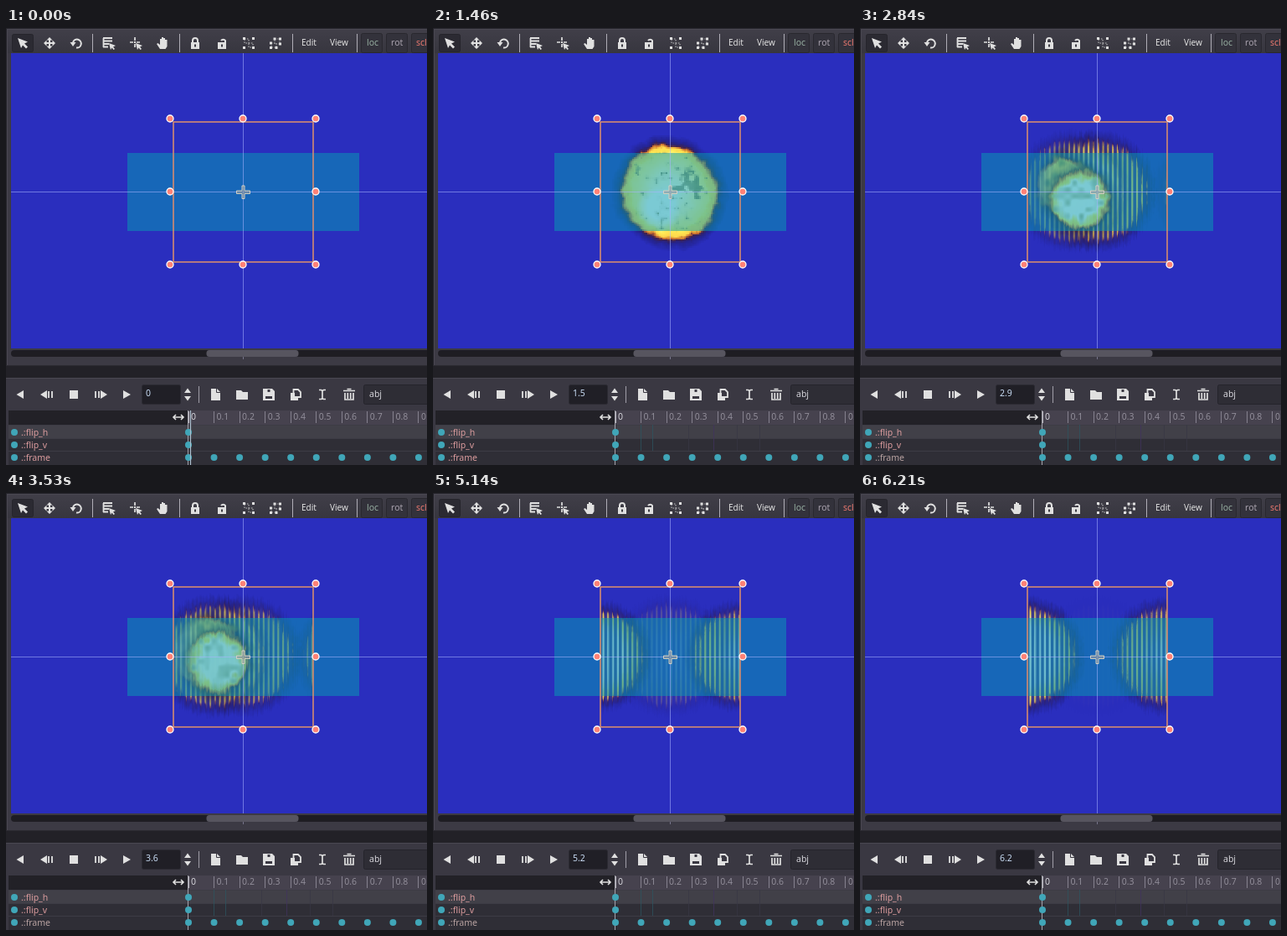
An HTML page with a canvas for the animation above (6290 ms loop, 503 by 521 pixels).

```html
<!DOCTYPE html>
<html lang="en">
<head>
<meta charset="utf-8">
<title>Sprite animation editor</title>
<style>
html, body { margin: 0; width: 100%; height: 100%; overflow: hidden; background: #3b3a43; }
svg, canvas { position: absolute; left: 0; top: 0; }
canvas { left: 200px; top: 112px; }
text { font: 10.5px "Noto Sans", "Open Sans", sans-serif; white-space: pre; }
.small { font-size: 10px; }
</style>
</head>
<body>
<svg id="base" width="503" height="521" viewBox="0 0 503 521">
  <defs>
    <linearGradient id="bar" x2="0" y2="1"><stop stop-color="#413f49"/><stop offset="1" stop-color="#37363f"/></linearGradient>
  </defs>
  <rect width="503" height="403" fill="#3c3a44"/>
  <rect width="503" height="30" fill="url(#bar)"/>
  <path d="M0 .5H503M.5 0V403" stroke="#25242b"/>
  <path d="M1 1.5H503M1.5 1V402" stroke="#4a4852"/>
  <rect x="6" y="30" width="497" height="352" fill="#2a2ebe"/>
  <rect x="6" y="384" width="510" height="8" rx="4" fill="#1e1d23"/>
  <rect x="239.500" y="384" width="110" height="8" rx="3.500" fill="#57555f"/>
  <rect y="403" width="503" height="14" fill="#222127"/>
  <rect y="417" width="503" height="104" fill="#3a3842"/>
  <path d="M0 402.500H503" stroke="#2b2a31"/>
  <path d="M0 417.500H503" stroke="#4a4852"/>
  <g id="tools" fill="none" stroke="#e0e0e0" stroke-width="2"></g>
  <g id="timeline"></g>
</svg>
<canvas id="fx" width="168" height="168"></canvas>
<svg id="over" width="503" height="521" viewBox="0 0 503 521">
  <rect x="145" y="149" width="277" height="93" fill="#069cb3" fill-opacity=".52"/>
  <path d="M6 195.500H503M283.500 30V382" stroke="#a9b4ff" stroke-opacity=".55"/>
  <path d="M283.500 392V395" stroke="#77758a"/>
  <rect x="200" y="112" width="167" height="167" fill="none" stroke="#d58b70" stroke-width="1.600"/>
  <path d="M282 188h3v6h6.500v3.500h-6.500v6h-3v-6h-6.500v-3.500h6.500z" fill="#96968c" fill-opacity=".5" stroke="#d2d0c4" stroke-width="1"/>
  <g id="handles" fill="#fd8276" stroke="#fff" stroke-width="1.300"></g>
  <g id="glow" fill="none" stroke="#7480ff">
    <rect x="6.500" y="30.500" width="510" height="350" stroke-opacity=".75"/>
    <rect x="7.500" y="31.500" width="510" height="348" stroke-opacity=".4"/>
    <rect x="9" y="33" width="510" height="345" stroke-width="2" stroke-opacity=".15"/>
    <path d="M6.500 383V392" stroke="#2a36d0"/>
  </g>
</svg>
<script>
const LOOP = 6290, FIRST = 80, STEP = 690 / 9, SIZE = 168, TICK = 30.55;
const $ = id => document.getElementById(id);
const range = (n, f) => Array.from({ length: n }, (_, i) => f(i)).join('');
const label = (x, y, s, fill, extra = '') => `<text x="${x}" y="${y}" fill="${fill}" stroke="none" ${extra}>${s}</text>`;
const path = (d, extra = '') => `<path d="${d}" ${extra}/>`;
const solid = (d, extra = '') => path(d, `fill="#e0e0e0" stroke="none" ${extra}`);
const line = (x, y, y2, color) => path(`M${x + .5} ${y}V${y2}`, `stroke="${color}" stroke-width="1"`);
const box = (x, y, w, h, fill, edge = 'none') =>
  `<rect x="${x}" y="${y}" width="${w}" height="${h}" rx="2" fill="${fill}" stroke="${edge}" stroke-width="1"/>`;
const at = (x, y, s) => `<g transform="translate(${x} ${y})">${s}</g>`;
const nodes = list => list.map(([x, y]) => solid(`M${x - 1.5} ${y - 1.5}h3v3h-3z`)).join('');

function drawTools() {
  const page = 'M-5 -7H2L6 -3V7H-5Z';
  const lock = solid('M-5 -1H5V7H-5Z') + solid('M-1 1.500h2v3h-2z', 'style="fill:#3b3a43"');
  const group = path('M-5 -5H0V0H-5ZM0 0H5V5H0Z', 'stroke-width="1.500" stroke-dasharray="1.500 1.500" opacity=".55"')
    + nodes([[-5.5, -5.5], [5.5, -5.5], [-5.5, 5.5], [5.5, 5.5]]);
  const ungroup = path('M-1 -5H5V1H-1ZM-5 0H1V5H-5Z', 'stroke-width="1" stroke-dasharray="1.500 1.500" opacity=".6"')
    + nodes([[-1, -5], [5.5, -5], [5.5, 1], [-5.5, 0], [-5.5, 5.5], [1, 5.5]]);
  const top = [
    box(7.5, 7.5, 25, 21, '#2b2a32', '#26252c'),
    at(20, 18, solid('M-6 -6L6 -1.500L2 .500L6 4.500L4 6.500L0 2.500L-2 6Z')),
    at(52, 18, path('M-4 0H4M0 -4V4') + solid('M0 -7L3.500 -3.500H-3.500ZM0 7L3.500 3.500H-3.500ZM-7 0L-3.500 -3.500V3.500ZM7 0L3.500 -3.500V3.500Z')),
    at(84, 18, path('M-4 -1A5 5 0 1 1 0 5.500') + solid('M-7.500 -1H-.500L-4 4Z')),
    at(123, 18, path('M-7 -6H4M-7 -2.500H4M-7 1H0M-7 4.500H-1M-6.500 -6V5', 'stroke-width="1.800"') + solid('M0 0L8 3L5 4.500L7 7L5.500 8L3.500 5.500L2 8Z')),
    at(155, 18, path('M-7 -1H-3M1 -1H5M-1 -7V-3M-1 1V5', 'stroke-width="1.700"') + solid('M-2 -2h2v2h-2zM0 0L8 3L5 4.500L7 7L5.500 8L3.500 5.500L2 8Z')),
    at(187, 18, solid('M-3 7L-7 1L-5.500 0L-3 2V-5H-1V-1V-7H1V-1V-6H3V0V-4H5.500V4L3.500 7Z')),
    at(226, 18, lock + path('M-3 0V-3A3 3 0 0 1 3 -3V0')),
    at(258, 18, lock + path('M-1 -3A3 3 0 0 1 4 -3V0')),
    at(290, 18, group), at(322, 18, ungroup),
    ...[103, 207, 342, 419].map(x => line(x, 7, 29, '#b0aeb7')),
    box(424.5, 6.5, 25, 23, '#33323b', '#29282f'), box(454.5, 6.5, 25, 23, '#33323b', '#29282f'),
    box(484.5, 6.5, 25, 23, '#33323b', '#29282f')
  ];
  const bottom = [
    solid('M21 432V442L12.500 437Z'), solid('M49 432V442L41 437Z'), path('M51 433V441M55 433V441', 'stroke-width="1.800"'),
    solid('M76 432h10v10h-10z'), path('M107 433V441M111 433V441', 'stroke-width="1.800"'), solid('M113 432V442L121 437Z'),
    solid('M140 432V442L149 437Z'),
    box(162.5, 425.5, 46, 23, '#201f26', '#2b2a32'),
    solid('M213 435L217 429.500L221 435ZM213 439L217 444.500L221 439Z'),
    line(230, 427, 447, '#a09ea8'),
    at(250, 437, solid(page) + path('M1.500 -7V-2.500H6', 'style="stroke:#3a3842" stroke-width="1"')),
    at(282, 437, solid('M-7 -5H-1L1 -3H7V6H-7Z')),
    at(314, 437, solid('M-7 -7H4L7 -4V7H-7Z') + path('M0 -6V-3M-4 3.500H4', 'style="stroke:#3a3842" stroke-width="3"')),
    at(346, 437, path('M-2.500 -6H3L6 -3V3H-2.500Z', 'stroke-width="1.800"') + solid('M-6 -2H-1V3H3V7H-6Z')),
    at(378, 437, path('M-4 -5.500H-1.500L0 -4.500L1.500 -5.500H4M0 -5V5M-4 5.500H-1.500L0 4.500L1.500 5.500H4', 'stroke-width="1.700"')),
    at(410, 437, path('M-7 -4.500H7M-2.500 -6.500H2.500M-5 -2V6H5V-2M-1.700 -2V5M1.700 -2V5', 'stroke-width="1.700"')),
    box(427.5, 425.5, 90, 23, '#2e2d35', '#25242b')
  ];
  const words = label(353, 21, 'Edit', '#e0e0e0', 'class="small"') + label(387, 21, 'View', '#e0e0e0', 'class="small"')
    + label(431, 21, 'loc', '#94ab9e') + label(460, 21, 'rot', '#a8a1ad') + label(490, 21, 'scl', '#e8776e')
    + label(434, 440, 'abj', '#d5d4da') + label(167, 439, '0', '#c8dcf4', 'id="count"');
  $('tools').innerHTML = top.join('') + bottom.join('') + words;
}

function drawTimeline() {
  const teal = '#40a6b8';
  const dot = (x, y) => `<circle cx="${x}" cy="${y}" r="4" fill="${teal}"/>`;
  const row = (i, s, id) => label(18, 485.5 + 15 * i, s, '#dc9c9e', `id="${id}"`) + dot(10, 482 + 15 * i);
  $('timeline').innerHTML =
    `<rect x="3" y="456" width="500" height="65" fill="#2f2e36"/>
     <rect x="3" y="456" width="215" height="17" fill="#222127"/>
     <rect x="218" y="456" width="285" height="17" fill="#46424e"/>
     <rect id="row" x="3" y="474" width="500" height="15" fill="#414048"/>
     <path d="M3 473.500H503M3 489.500H503M3 504.500H503" stroke="#3d3c45"/>` +
    `<path d="M201 464H211M203 461L200 464L203 467M209 461L212 464L209 467" fill="none" stroke="#e0e0e0" stroke-width="1.600"/>` +
    line(217, 456, 521, '#a3a2ab') +
    range(10, i => line(Math.round(217.5 + i * TICK), 457, 471, i ? '#86828f' : '#b9b8c0')
      + label(221 + i * TICK, 467, i ? '0.' + i : '0', i ? '#918d99' : '#d2d1d8')) +
    [[248, '#2c5661'], [262, '#2c5661'], [305, '#393744'], [335, '#42335f'], [363, '#393744'], [390, '#393744']]
      .map(([x, c]) => `<path class="trail" data-x="${x}" d="M${x}.500 473V504" stroke="${c}" stroke-opacity=".75"/>`).join('') +
    row(0, '.:flip_h', 'flipH') + row(1, '.:flip_v', 'flipV') + row(2, '.:frame', 'frameRow') +
    dot(218, 482) + dot(218, 497) + range(10, i => dot(218 + i * TICK, 512)) +
    '<path id="head" d="M0 456V521" stroke-width="1.200"/>';
}

const spots = [[196, 108], [283, 108], [370, 108], [196, 195], [370, 195], [196, 282], [283, 282], [370, 282]];
$('handles').innerHTML = spots.map(([x, y]) => `<circle cx="${x}" cy="${y}" r="4"/>`).join('');
drawTools();
drawTimeline();
const trails = [...document.querySelectorAll('.trail')];

const clamp = (v, a = 0, b = 1) => Math.min(b, Math.max(a, v));
const mix = (a, b, p) => a + (b - a) * p;
const ease = p => p * p * (3 - 2 * p);

function hash(x, y, s) {
  let h = Math.imul(x + 911, 374761393) ^ Math.imul(y + 577, 668265263) ^ Math.imul(s + 31, 974711);
  h = Math.imul(h ^ (h >>> 13), 1274126177);
  return ((h ^ (h >>> 16)) >>> 0) / 4294967296;
}
function noise(x, y, s) {
  const i = Math.floor(x), j = Math.floor(y), u = ease(x - i), v = ease(y - j);
  return mix(mix(hash(i, j, s), hash(i + 1, j, s), u), mix(hash(i, j + 1, s), hash(i + 1, j + 1, s), u), v);
}
const tint = (c, to, p) => c.map((v, j) => j < 3 ? mix(v, to[j], p) : v);

// depth to fire colour: smoke, ember, orange, yellow, white
const RAMP = [[-12, 18, 14, 60, 0], [-4, 28, 18, 60, .35], [0, 75, 32, 40, .75], [2, 205, 110, 40, .95],
  [5, 255, 215, 75, 1], [12, 255, 238, 90, 1], [24, 255, 250, 205, 1], [32, 252, 253, 250, 1]];
function fire(d) {
  if (d <= -12) return null;
  for (let i = 1; i < RAMP.length; i++) {
    const a = RAMP[i - 1], b = RAMP[i];
    if (d < b[0]) {
      const p = (d - a[0]) / (b[0] - a[0]);
      return [1, 2, 3, 4].map(j => mix(a[j], b[j], p));
    }
  }
  return RAMP[RAMP.length - 1].slice(1);
}

// frame, ball x, ball radius, strength, core x, core y, core radius, core strength, ghost strength
const POSES = [
  [21, 82, 61, 0, 82, 82, 60, 1, 0],
  [24, 70, 61, .3, 74, 86, 48, .95, .9],
  [29, 50, 61, .6, 59, 94, 34, 1, .9],
  [43, 43, 61, .95, 44, 82, 60, .7, .4],
  [52, -3, 55, .9, 20, 82, 40, 0, .25],
  [63, -1.5, 60, .95, 10, 82, 30, 0, 0]
];
function poseAt(n) {
  let i = 1;
  while (i < POSES.length - 1 && n > POSES[i][0]) i++;
  const a = POSES[i - 1], b = POSES[i], p = clamp((n - a[0]) / (b[0] - a[0]));
  return a.map((v, j) => mix(v, b[j], p));
}

const ctx = $('fx').getContext('2d');
const image = ctx.createImageData(SIZE, SIZE);

function wholeBall(n, x, y) {
  x &= ~1; y &= ~1;
  const grow = Math.sqrt(clamp(n / 7)), merge = ease(clamp((n - 7) / 10));
  const rough = ((noise(x / 9, y / 9, n) - .5) * 8 + (noise(x / 3, y / 3, n) - .5) * 4) * (1 - merge * .5);
  const lobe = (cx, cy, r) =>
    mix(r * grow, 60, merge) - Math.hypot(x - mix(cx, 82, merge), y - mix(cy, 82, merge));
  const d = Math.max(lobe(67, 74, 41), lobe(92, 96, 42)) + rough;
  const top = clamp((62 - y) / 20) * (1 - merge) * 5;
  const pale = mix(1.9, .55, merge);
  const patch = clamp(1 - Math.hypot(x - 68, y - 104) / 27) * merge;
  const c = fire(d <= 6 ? d - top : Math.min(13, d) + Math.max(0, d - 9) * (pale - .5) * 1.1 + patch * 30);
  if (!c || d < 8) return c;
  const spot = noise(x / 6, y / 6, 5 + (n >> 2)) * .75 + noise(x / 2.5, y / 2.5, 9) * .25;
  const near = clamp(1.2 - Math.hypot((x - 102) / 24, (y - 76) / 20));
  const chip = clamp(1.1 - Math.hypot((x - 44) / 9, (y - 62) / 7));
  const dark = mix(clamp((spot - .58) * 3) * .65, clamp((spot + Math.max(near, chip) * .5 - .78) * 6) * .75, merge);
  return tint(c, [105, 105, 60], dark);
}

function splitBall(n, pose, x, y) {
  const [, bx, br, strength, cx, cy, cr, core, ghost] = pose;
  const grain = (hash(x, 3, n) - .5) * 5 + (noise(x / 2, y / 4, n) - .5) * 4;
  const wave = .5 + .5 * Math.cos((x - 3) * 2 * Math.PI / 5.8);
  const column = .65 + .35 * hash(Math.round(x / 5.8), 2, 4);
  const out = [0, 0, 0, 0];
  const add = (c, k) => {
    if (!c) return;
    const a = clamp(c[3] * k), t = a + out[3] * (1 - a);
    if (!t) return;
    for (let j = 0; j < 3; j++) out[j] = (c[j] * a + out[j] * out[3] * (1 - a)) / t;
    out[3] = t;
  };
  const striped = (px, r, k, pale) => {
    const d = r + grain - Math.hypot(x - px, y - 82);
    if (d < -12) return;
    const lit = clamp(wave * wave * 1.5 - .3 + d / 200) * column;
    add(fire(Math.min(d, -3)), k * .8);
    add(fire(d < 6 ? d : Math.min(d * pale, 32)), k * (.1 + .9 * lit) * clamp(.5 + d / 14));
  };
  const blob = (px, py, r, pale, shade) => {
    const swirl = noise(x / 8, y / 8, n >> 1) - .5;
    const d = r + swirl * 6 + grain * .5 - Math.hypot(x - px, y - py);
    const c = fire(d < 5 ? d : Math.max(6, d * pale + swirl * 16));
    if (c) add(tint(c, [125, 120, 55], clamp(shade + swirl)), core * clamp(x / 40 + .1));
  };
  if (ghost > .01) striped(82, 61, ghost, .7);
  if (strength > .01) {
    striped(bx, br, strength, 1.2);
    striped(bx + SIZE, br, strength * .82, .6);
  }
  if (core > .01) {
    const fresh = clamp((core - .7) / .3);
    blob(cx - 20 * fresh, cy - 18 * fresh, cr * mix(1, .9, fresh), .5, .25);
    if (fresh) blob(cx, cy, cr * mix(.6, 1, fresh), 2.2, 0);
  }
  return out;
}

function drawBlast(n) {
  const data = image.data, pose = poseAt(n);
  data.fill(0);
  if (n > 0) for (let y = 0, i = 0; y < SIZE; y++) for (let x = 0; x < SIZE; x++, i += 4) {
    const c = n <= 21 ? wholeBall(n, x, y) : splitBall(n, pose, x, y);
    if (c) for (let j = 0; j < 4; j++) data[i + j] = j < 3 ? c[j] : c[3] * 255;
  }
  ctx.putImageData(image, 0, 0);
}

let shown = -1;
function render(ms) {
  const t = ms % LOOP;
  const k = t < FIRST ? 0 : 1 + Math.floor((t - FIRST) / STEP + 1e-6);
  if (k === shown) return;
  shown = k;
  const time = .01 + .0778 * k, x = 218 + time * TICK * 10;
  const focus = k >= 23 && k < 31;
  $('count').textContent = String(Math.round(time * 10) / 10);
  $('head').setAttribute('transform', `translate(${Math.round(x) - .5} 0)`);
  $('head').setAttribute('stroke', k ? '#c4603f' : '#a9bccb');
  $('head').style.display = x < 485 ? '' : 'none';
  trails.forEach(e => e.style.display = x > +e.dataset.x + 8 ? '' : 'none');
  $('glow').style.display = focus ? '' : 'none';
  $('row').setAttribute('fill', focus ? '#4c4a4e' : '#414048');
  $('flipH').setAttribute('fill', focus ? '#dda04c' : '#dc9c9e');
  $('frameRow').setAttribute('fill', k < 31 ? '#dc9c9e' : '#b9a3a2');
  drawBlast(Math.floor(time * 10));
}

const start = performance.now();
function tick() {
  render(performance.now() - start);
  requestAnimationFrame(tick);
}
tick();
</script>
</body>
</html>
```
